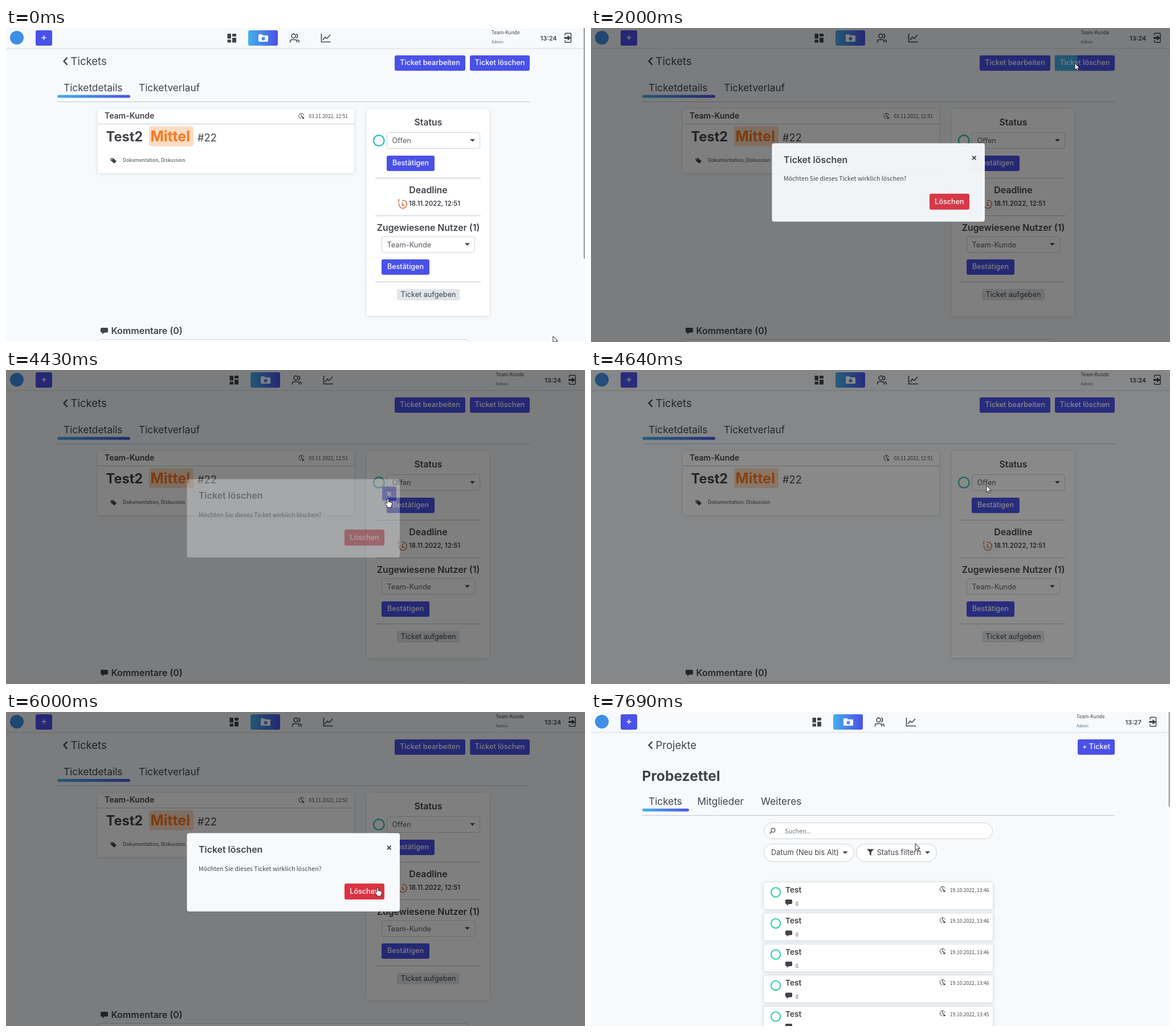
Write an HTML page that moves like this. It is 1016x551 px and loops after 7.76 s.

```html
<!DOCTYPE html>
<html lang="de">
<head>
<meta charset="utf-8">
<title>Ticket löschen</title>
<style>
html, body { margin: 0; width: 100%; height: 100%; overflow: hidden; background: #f7fafc; }
svg { display: block; width: 1016px; height: 551px; }
text { font-family: Inter, "Open Sans", sans-serif; white-space: pre; }
text.small { font-family: "Noto Sans CJK JP", "Noto Sans CJK SC", "Noto Sans CJK", "Noto Sans", sans-serif; }
.card { filter: drop-shadow(0 1px 3px rgba(40, 60, 80, .16)); }
</style>
</head>
<body>
<svg id="stage" viewBox="0 0 1016 551"></svg>
<script>
const LOOP = 7760, INK = '#40444a', BLUE = '#4a51e8', SKY = '#45b0ea';
const USER = 'Team-Kunde';
const stage = document.getElementById('stage');

// --- drawing helpers, each returns markup ---
const text = (x, y, size, str, { w = 400, a = 'start', c = INK, cls = '', id = '' } = {}) =>
  `<text id="${id}" class="${cls}" x="${x}" y="${y}" font-size="${size}" font-weight="${w}" text-anchor="${a}" fill="${c}">${str}</text>`;
const small = (x, y, size, str, opt = {}) => text(x, y, size, str, { cls: 'small', ...opt });
const title = (x, y, size, str, a = 'start') => text(x, y, size, str, { w: 600, a });
const rect = (x, y, w, h, r, fill, extra = '') =>
  `<rect x="${x}" y="${y}" width="${w}" height="${h}" rx="${r}" fill="${fill}" ${extra}/>`;
const line = (d, width = 1, c = INK, extra = '') =>
  `<path d="${d}" fill="none" stroke="${c}" stroke-width="${width}" ${extra}/>`;
const shape = (d, c = INK) => `<path d="${d}" fill="${c}"/>`;
const ring = (x, y, r, width, c) =>
  `<circle cx="${x}" cy="${y}" r="${r}" fill="none" stroke="${c}" stroke-width="${width}"/>`;
const at = (x, y, body, id = '') => `<g id="${id}" transform="translate(${x} ${y})">${body}</g>`;
const rule = (x1, x2, y) => line(`M${x1} ${y}H${x2}`, 1, '#c3c7cb');
const caret = (x, y) => shape(`M${x - 4.5} ${y - 2}h9l-4.5 4.5z`);
const label = (x, y, str) => text(x, y, 12.6, str, { w: 500, a: 'middle', c: '#fff' });
const button = (x, y, w, str, fill = '') =>
  rect(x, y, w, 27, 3, BLUE) + fill + label(x + w / 2, y + 17.2, str);
const card = (x, y, w, h) => rect(x, y, w, h, 3, '#fff', 'class="card"');
const select = (x, y, str) =>
  rect(x + .5, y, 163, 28, 3, '#fff', 'stroke="#ced4da"') + text(x + 9.5, y + 18.5, 12.8, str, { c: '#595d63' }) + caret(x + 150.5, y + 13.5);
const bubble = (x, y, k) => `<g transform="translate(${x} ${y}) scale(${k})">` +
  shape('M2 0h9q2 0 2 2v4.5q0 2-2 2H6.5L3 11.5V8.5H2q-2 0-2-2V2q0-2 2-2z') + '</g>';
const clock = (x, y) => at(x, y,
  line('M4.2 -1.5A4.5 4.5 0 1 0 -.5 4.3M-.3 -4.3V.4H2.5') + shape('M1 .8L5.5 3.3L1.8 5.6z'));
const back = str => line('M107.5 52L101.5 58.3L107.5 64.6', 2.4) + text(113.5, 64.5, 18.5, str);
const tabs = (y, width, list) =>
  list.map(([x, str]) => text(x, y, 17.3, str)).join('') +
  rect(90, y + 7, width, 5, 2.5, 'url(#grad)') + rule(90, 919, y + 19);

// --- page parts ---
const navIcons =
  [[388.5, 10, 6.5, 8.5], [397, 10, 7, 5], [388.5, 20.5, 6.5, 5], [397, 17, 7, 8.5]].map(b => rect(...b, .5, INK)).join('') +
  rect(425, 4, 52, 27, 3, 'url(#grad)') +
  shape('M443 12.5q0-1.5 1.5-1.5h4.5l2 2h7.5q1.5 0 1.5 1.5v8q0 1.5-1.5 1.5h-14q-1.5 0-1.5-1.5z', '#fff') +
  '<circle cx="451.5" cy="18.7" r="3" fill="#4889e8"/>' +
  ring(504.5, 14, 3.6, 1.6, INK) +
  line('M498.5 25.5v-1.5q0-3.5 3.5-3.5h5q3.5 0 3.5 3.5v1.5M509 10.5a3.6 3.6 0 0 1 0 7M511.5 20.7q2.7.8 2.7 3.5v1.3', 1.6) +
  line('M553.5 10V24.5H570M556 21l4-5 3 2.5 6-6.5', 1.6);

const navRight =
  small(852, 10.5, 8.4, USER, { w: 500 }) + small(852, 26.5, 6.9, 'Admin', { c: '#4c6b86' }) +
  text(937.5, 21.5, 11, '', { w: 600, id: 'time' }) +
  line('M981 13v-2.5q0-1.2 1.2-1.2h8.1q1.2 0 1.2 1.2v13.6q0 1.2-1.2 1.2h-8.1q-1.2 0-1.2-1.2V21.5', 1.5) +
  shape('M979.5 15.7h6v-3l6 4.7-6 4.7v-3h-6z');

const header =
  rect(0, 35, 1016, 1, 0, '#dfe3e6') + rect(0, 36, 1016, 1.5, 0, '#eff2f4') +
  '<circle cx="19" cy="17" r="12" fill="#3f8fe6"/>' +
  rect(52, 4, 29, 27, 3, BLUE) + line('M62.5 17h8M66.5 13v8', 1.5, '#fff') +
  at(0, 0, navIcons, 'navIcons') + at(0, 0, navRight, 'navRight') +
  rect(1013.5, -4, 4, 409, 2, '#a3a6a9', 'id="scroll"');

const details =
  back('Tickets') +
  button(682, 48, 124, 'Ticket bearbeiten') +
  button(814, 48, 105, 'Ticket löschen',
    rect(814, 48, 105, 27, 3, SKY, 'id="sweep"') +
    rect(813.5, 47.5, 106, 28, 3.5, 'none', 'id="focus" stroke="#9fc4f2" stroke-width="1.5"')) +
  tabs(110.5, 128, [[101, 'Ticketdetails'], [233, 'Ticketverlauf']]) +
  card(161, 142, 450, 112.5) + title(173, 159, 14, USER) + clock(518.5, 154.5) +
  small(600, 158, 8.6, '03.11.2022, 12:51', { a: 'end' }) + rule(161, 611, 168.5) +
  text(175.5, 198.5, 23.6, 'Test2', { w: 700 }) + rect(251, 172.5, 78, 35, 4, '#fddcc3') +
  text(253.5, 198.5, 25, 'Mittel', { w: 700, c: '#f9791d' }) + text(336, 198.5, 18.3, '#22') +
  shape('M183.5 228.5h4.8l5.7 5.3-4 4-6.5-5.5z') + '<circle cx="185.7" cy="230.5" r=".9" fill="#fff"/>' +
  small(205, 235.3, 8.55, 'Dokumentation, Diskussion') +
  card(633, 142, 215, 363) + title(741, 171, 15.8, 'Status', 'middle') +
  ring(654.3, 197.5, 9.3, 2.4, '#35c2bc') + select(668, 183.5, 'Offen') +
  button(668, 224, 84, 'Bestätigen') + rule(648, 833, 263.5) +
  title(741, 290, 15.9, 'Deadline', 'middle') +
  line('M695 302.5A7 7 0 1 1 689.5 308M689.3 300v5.5M689.3 307.2v1.5M695.5 305.5v5.5h4', 1.4, '#c4602e') +
  title(707, 312.2, 11.4, '18.11.2022, 12:51') + rule(648, 833, 329.5) +
  title(741, 356, 15.8, 'Zugewiesene Nutzer (1)', 'middle') + select(659, 366, USER) +
  button(659, 406, 84, 'Bestätigen') + rule(648, 833, 445.5) +
  rect(686, 458, 110, 20, 3, '#e1e6ea') + text(741, 472.3, 12.7, 'Ticket aufgeben', { a: 'middle' }) +
  bubble(166, 526, 1) + title(184.5, 537, 16, 'Kommentare (0)') +
  rect(160.5, 546.5, 651, 30, 4, '#fff', 'stroke="#ced4da"');

const pill = (x, y, w, h) => rect(x, y, w, h, h / 2, '#fff', 'stroke="#ccd2d7"');
const entry = i => at(0, 54.5 * i,
  rect(303, 298.5, 402.5, 48, 3, '#fff', 'class="card" stroke="#dfe3e6"') + ring(324.2, 316.5, 8.2, 2, '#2bcdb0') +
  title(341, 316.8, 13.7, 'Test') + bubble(341, 329, .93) + small(359, 339.5, 8.6, '0') + clock(617, 311) +
  small(698.5, 315.8, 8.6, '19.10.2022, 13:4' + (i < 4 ? 6 : 5), { a: 'end' }));
const overview =
  back('Projekte') + button(854, 48, 65, '+ Ticket') +
  text(89.5, 120.5, 24.6, 'Probezettel', { w: 700 }) +
  tabs(162.5, 82, [[101, 'Tickets'], [186.5, 'Mitglieder'], [298, 'Weiteres']]) +
  pill(303.5, 194.5, 401, 28) + ring(319.5, 207.5, 3.4, 1.1, INK) + line('M317 210l-3.5 3.5', 1.3) +
  small(340, 213, 10.8, 'Suchen...', { c: '#6c757d' }) +
  pill(303.5, 231.5, 158, 31) + text(316, 251, 12.9, 'Datum (Neu bis Alt)') + caret(446, 246.5) +
  pill(465.5, 231.5, 141, 31) + shape('M484 240.5h12.5l-4.7 5.5v6l-3-2v-4z') +
  text(501.5, 251, 12.9, 'Status filtern') + caret(590.5, 246.5) +
  [0, 1, 2, 3, 4].map(entry).join('');

const dialog =
  rect(317.5, 212.5, 373.5, 137.5, 4, '#f7fafc') + title(338, 247, 15.9, 'Ticket löschen') +
  rect(660, 225.5, 25, 25, 3, BLUE, 'id="closeBg"') +
  line('M669 235l6.5 6.5M675.5 235l-6.5 6.5', 1.8, INK, 'id="closeX"') +
  small(338, 278.5, 10.7, 'Möchten Sie dieses Ticket wirklich löschen?') +
  rect(594, 301, 70, 28, 3, '#dc3545') + rect(594, 301, 70, 28, 3, '#c01f30', 'id="redHover"') +
  label(629, 319, 'Löschen');

const outline = 'stroke="#222" stroke-width="1" stroke-linejoin="round"';
const arrow = `<path d="M0 0V11.5L2.7 9L4.6 13.2L6.5 12.3L4.7 8.3H8.3z" fill="#fff" ${outline}/>`;
const hand = `<path d="M-1.2 1q0-1.3 1.3-1.3T1.4 1v4.2l5 1.2q1.3.4 1.2 1.8-.1 3-1.6 5v2H-1v-1.8q-2.2-2.5-3.8-5.4-.4-1.5 1-1.5 1.3.5 2.6 2z" fill="#fff" ${outline}/>`;

stage.innerHTML =
  `<defs><linearGradient id="grad"><stop stop-color="${SKY}"/><stop offset="1" stop-color="${BLUE}"/></linearGradient></defs>` +
  rect(0, 0, 1016, 551, 0, '#f7fafc') + header + at(0, 0, details, 'details') + at(0, 0, overview, 'overview') +
  rect(0, 0, 1016, 551, 0, '#000', 'id="shade"') + at(0, 0, dialog, 'dialog') +
  at(0, 0, at(0, 0, arrow, 'arrow') + at(0, 0, hand, 'hand'), 'cursor');

// --- motion ---
const OPEN1 = 1708, CLOSE = 4330, OPEN2 = 5227, LEAVE = 6720;
const route = [
  [0, 960, 541], [70, 955, 535], [300, 760, 300], [430, 562, 110], [560, 640, 50], [700, 715, 115],
  [800, 752, 140], [1000, 822, 72], [1410, 849, 62], [2350, 849, 62], [2600, 720, 180], [2850, 574, 290],
  [3000, 590, 325], [3140, 618, 320], [3210, 618, 317], [3600, 618, 317], [4080, 670, 226], [4600, 670, 226],
  [4900, 845, 58], [5450, 845, 58], [5900, 690, 280], [5990, 656, 303], [6000, 652, 308], [6620, 618, 318],
  [7020, 618, 318], [7400, 590, 260], [7690, 569, 231], [LOOP, 569, 231]];
const ramp = (t, start, len) => Math.min(1, Math.max(0, (t - start) / len));
const out = u => 1 - (1 - u) ** 2;
const part = id => document.getElementById(id);
const set = (id, attr, value) => part(id).setAttribute(attr, value);
const show = (id, on) => set(id, 'display', on ? 'inline' : 'none');
const move = (id, x, y) => set(id, 'transform', `translate(${x} ${y})`);
const inside = ([x, y], l, t, r, b) => x >= l && x <= r && y >= t && y <= b;

function pointer(t) {
  const i = Math.max(1, route.findIndex(k => k[0] > t));
  const [t0, x0, y0] = route[i - 1], [t1, x1, y1] = route[i];
  const u = (t - t0) / (t1 - t0);
  return [x0 + (x1 - x0) * u, y0 + (y1 - y0) * u];
}

// The delete button fills on hover and empties once the backdrop covers it.
function sweepAt(t) {
  const [enter, open] = t < CLOSE ? [1000, OPEN1] : [4840, OPEN2];
  return out(ramp(t, enter, 325)) * (1 - ramp(t, open - 55, 900)) ** 2;
}

function draw(t) {
  const listed = t >= LEAVE;
  const locked = !listed && (t >= OPEN1 - 15 && t < CLOSE + 450 || t >= OPEN2 - 15);
  const blend = (a, b, c, len, ease = u => u) =>
    listed ? 0 : ease(ramp(t, a, len)) - ease(ramp(t, b, len)) + ease(ramp(t, c, len));

  show('details', !listed);
  show('overview', listed);
  part('time').textContent = listed ? '13:27' : '13:24';
  move('navIcons', locked ? 4 : 0, 0);
  move('navRight', locked ? 7.5 : 0, 0);
  show('scroll', !locked);
  set('scroll', 'height', listed ? 170 : 409);

  const sweep = sweepAt(t);
  set('sweep', 'width', 105 * sweep);
  set('focus', 'opacity', locked ? sweep : 0);

  set('shade', 'opacity', .5 * blend(OPEN1, CLOSE + 300, OPEN2, 150));
  const opacity = blend(OPEN1 + 150, CLOSE, OPEN2 + 150, 150);
  set('dialog', 'opacity', opacity);
  move('dialog', 0, -37.5 * (1 - blend(OPEN1 + 150, CLOSE, OPEN2 + 150, 300, out)));
  set('redHover', 'opacity', blend(3020, 3685, 5990, 150));
  const onClose = t >= 3990 && t < OPEN2;
  set('closeBg', 'opacity', onClose ? ramp(t, 3990, 90) : 0);
  set('closeX', 'stroke', onClose ? '#fff' : INK);

  const p = pointer(t);
  const linked = listed ? p[1] > 298
    : locked ? opacity > 0 && (inside(p, 594, 301, 664, 329) || inside(p, 660, 225, 685, 251))
    : inside(p, 814, 48, 919, 75) || inside(p, 682, 48, 806, 75) || inside(p, 668, 224, 752, 251);
  move('cursor', ...p);
  show('arrow', !linked);
  show('hand', linked);
}

const start = performance.now();
function tick() {
  draw((performance.now() - start) % LOOP);
  requestAnimationFrame(tick);
}
tick();
</script>
</body>
</html>
```
